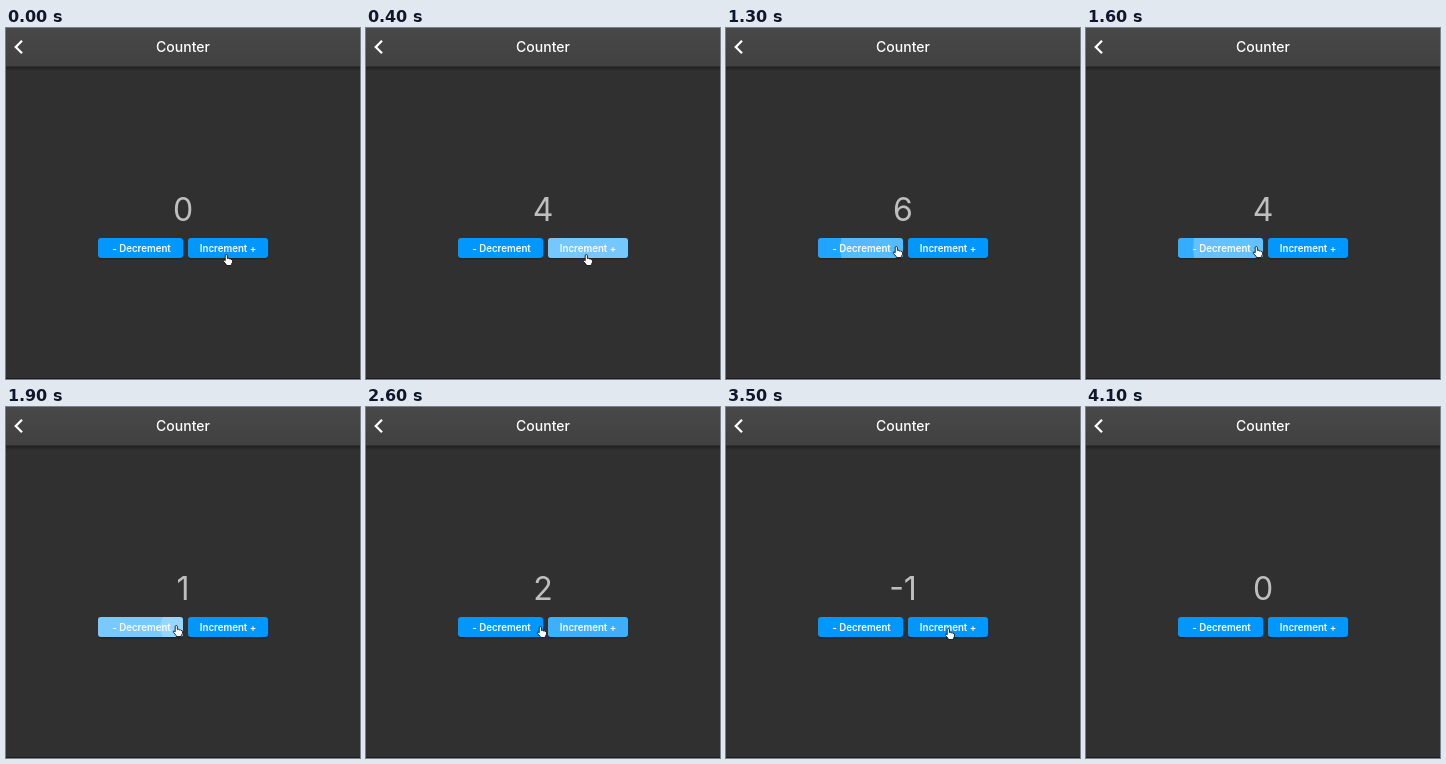
Recreate the animation shown at these times as an HTML page. Size 354x351 px, loop 4300 ms.

```html
<!DOCTYPE html>
<html lang="en">
<head>
<meta charset="utf-8">
<title>Counter</title>
<style>
  html, body { margin: 0; width: 100%; height: 100%; overflow: hidden; background: #303030; }
  svg { display: block; width: 100%; height: 100%; }
  text { font-family: Inter, "Open Sans", sans-serif; text-anchor: middle; fill: #fff; }
  .title { font-size: 14px; font-weight: 500; }
  .count { font-size: 32px; fill: #bebebe; }
  .label { font-size: 9.7px; font-weight: 600; }
  .face { fill: #0098ff; }
  .ink { fill: #fff; }
</style>
</head>
<body>
<svg viewBox="0 0 354 351">
  <defs>
    <linearGradient id="bar" x2="0" y2="1">
      <stop stop-color="#484848"/><stop offset="1" stop-color="#414141"/>
    </linearGradient>
    <linearGradient id="shade" x2="0" y2="1">
      <stop stop-color="#000" stop-opacity=".4"/><stop offset="1" stop-color="#000" stop-opacity="0"/>
    </linearGradient>
    <clipPath id="decClip"><rect x="92" y="210" width="85" height="20" rx="3"/></clipPath>
    <clipPath id="incClip"><rect x="182" y="210" width="80" height="20" rx="3"/></clipPath>
  </defs>
  <rect width="354" height="351" fill="#303030"/>
  <rect y="38" width="354" height="5" fill="url(#shade)"/>
  <rect width="354" height="38.5" fill="url(#bar)"/>
  <rect y="350" width="354" height="1" fill="#1c1c1c"/>
  <path d="M16 12.8 9.8 19 16 25.2" fill="none" stroke="#fff" stroke-width="2.3"/>
  <text class="title" x="177" y="24">Counter</text>
  <text class="count" id="count" x="177" y="193">0</text>

  <g fill="#000" opacity=".22">
    <rect x="92" y="211.5" width="85" height="20" rx="3"/>
    <rect x="182" y="211.5" width="80" height="20" rx="3"/>
  </g>
  <g id="dec" clip-path="url(#decClip)">
    <rect class="face" x="92" y="210" width="85" height="20"/>
    <rect class="ink" x="92" y="210" width="85" height="20" opacity="0"/>
  </g>
  <g id="inc" clip-path="url(#incClip)">
    <rect class="face" x="182" y="210" width="80" height="20"/>
    <rect class="ink" x="182" y="210" width="80" height="20" opacity="0"/>
  </g>
  <text class="label" x="135.5" y="224">- Decrement</text>
  <text class="label" x="222" y="224">Increment +</text>

  <path id="hand" fill="#fff" stroke="#151515" stroke-width=".9" stroke-linejoin="round"
    d="M-2.8 .8V-4.2Q-2.8-5.5-1.7-5.5T-.6-4.2V-1.5Q.6-2.2 1.3-1.1 2.5-1.7 3-.5 4.6-.8 4.6 .8 4.6 3 3.4 4.2V5.5H-1.8V4.5L-4.6 1.3Q-5.1 0-3.9-.1Z"/>
</svg>
<script>
const LOOP = 4300, STEP = 100, TINT = 0.24;
const $ = id => document.getElementById(id);
const clamp = v => Math.max(0, Math.min(1, v));
const ramp = (v, from, to) => clamp((v - from) / (to - from));

// Pointer stops: time, x, y
const path = [
  [0, 222, 232], [600, 222, 232], [700, 220, 232], [900, 197, 228], [1100, 172, 225],
  [1200, 172, 224], [2000, 172, 224], [2300, 224, 226], [2500, 223, 226], [2600, 176, 225],
  [2700, 174, 225], [3100, 174, 225], [3400, 224, 227], [LOOP, 224, 227]
];

function pointerAt(t) {
  const i = path.findIndex(p => p[0] > t);
  const [t0, x0, y0] = path[i - 1], [t1, x1, y1] = path[i];
  const k = (t - t0) / (t1 - t0);
  return [x0 + (x1 - x0) * k, y0 + (y1 - y0) * k];
}

function makeButton(id, delta, times) {
  const group = $(id);
  const presses = times.map(time => {
    const circle = document.createElementNS("http://www.w3.org/2000/svg", "circle");
    const [x] = pointerAt(time);
    circle.setAttribute("class", "ink");
    circle.setAttribute("cx", x);
    circle.setAttribute("cy", 220);
    group.append(circle);
    return { time, circle };
  });
  return { delta, presses, highlight: group.querySelector(".ink") };
}

const buttons = [
  makeButton("inc", 1, [...Array.from({ length: 8 }, (_, i) => 16 + 97 * i), 2395, 3550]),
  makeButton("dec", -1, [1220, 1300, 1380, 1510, 1699, 1788, 1875, 2750, 2830, 2975])
];

function drawButton({ delta, presses, highlight }, t) {
  let glow = 0, total = 0;
  for (const { time, circle } of presses) {
    const age = t - time;
    if (age >= 0) total += delta;
    glow = Math.max(glow, Math.min(ramp(age, 50, 110), 1 - ramp(age, 150, 350)));
    circle.setAttribute("r", Math.max(0, Math.min(90, age * 0.72)));
    circle.setAttribute("opacity", age < 0 ? 0 : TINT * (1 - ramp(age, 130, 240)));
  }
  highlight.setAttribute("opacity", TINT * glow);
  return total;
}

function draw(now) {
  const t = Math.floor((now % LOOP) / STEP) * STEP;
  const count = buttons.reduce((sum, button) => sum + drawButton(button, t), 0);
  $("count").textContent = count;
  $("hand").setAttribute("transform", `translate(${pointerAt(t)})`);
  $("hand").setAttribute("visibility", t < 4100 ? "visible" : "hidden");
}

const start = performance.now();
function tick() {
  draw(performance.now() - start);
  requestAnimationFrame(tick);
}
tick();
</script>
</body>
</html>
```
